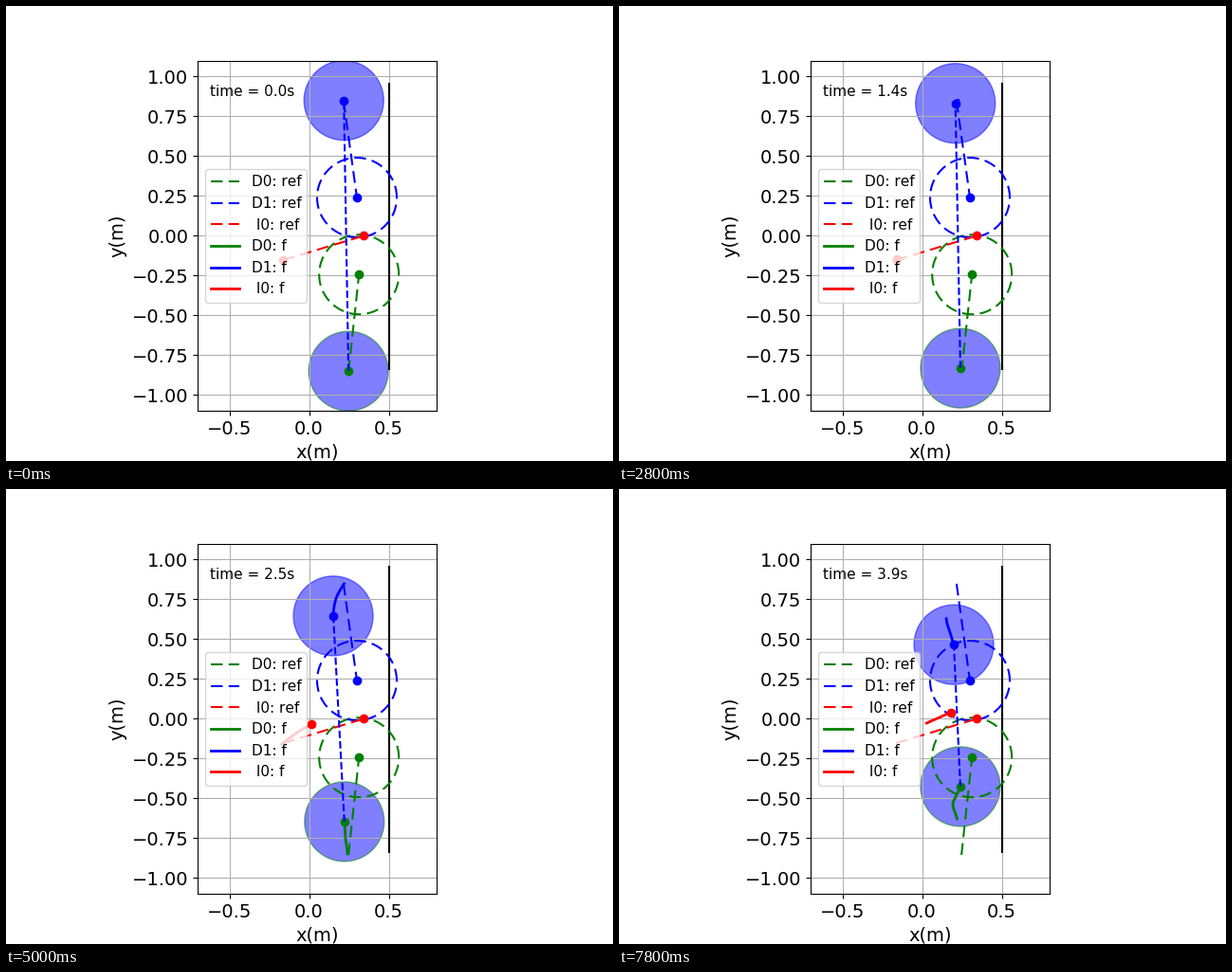
Animation, 640 px wide and 480 px high, one loop 8000 ms. Source, as a matplotlib script:

```python
import numpy as np
import matplotlib.pyplot as plt
from matplotlib.animation import FuncAnimation
from matplotlib.patches import Circle

FRAMES = 40
STEP = 0.1        # simulated seconds per frame
WINDOW = 13       # trail length in frames
RADIUS = 0.25
LONG_DASH = (0, (6, 3))
t = np.arange(FRAMES) * STEP


def approach(rate=1.0, start=1.1):
    """Critically damped response from 0 towards 1."""
    u = np.maximum(t - start, 0) * rate
    return 1 - (1 + u) * np.exp(-u)


def sway(*values):
    """Smooth curve through evenly spaced values over the whole run."""
    v = np.array(values)
    slope = np.gradient(v)
    s = t / t[-1] * (len(v) - 1)
    i = np.minimum(s.astype(int), len(v) - 2)
    u = s - i
    return ((1 + 2 * u) * (1 - u) ** 2 * v[i] + u * (1 - u) ** 2 * slope[i]
            + u * u * (3 - 2 * u) * v[i + 1] + u * u * (u - 1) * slope[i + 1])


wobble = .005 * np.cos(3 * t)
push = .11 * np.maximum(t - 3.3, 0) ** 2
tracks = {
    "green": np.column_stack([sway(.247, .232, .241, .228, .219, .193, .240),
                              -.850 + .5 * approach() + push]),
    "blue": np.column_stack([sway(.218, .228, .215, .166, .152, .178, .199),
                             .850 - .5 * approach()]),
    "red": np.column_stack([-.171 + .45 * approach() + wobble,
                            -.158 + .22 * approach(1.33) + wobble]),
}
labels = {"green": "D0", "blue": "D1", "red": " I0"}
starts = {"green": (.247, -.855), "blue": (.216, .848), "red": (-.164, -.153)}
goals = {"green": (.313, -.243), "blue": (.300, .240), "red": (.343, 0)}

plt.rcParams["font.family"] = "DejaVu Sans"
plt.rcParams["text.kerning_factor"] = 6
fig, ax = plt.subplots(figsize=(6.4, 4.8), dpi=100)
ax.set_aspect("equal")
ax.set(xlim=(-.7, .8), ylim=(-1.1, 1.1))
ax.set_xlabel("x(m)", fontsize=14)
ax.set_ylabel("y(m)", fontsize=14)
ax.tick_params(labelsize=14)
ax.set_yticks(np.arange(-1, 1.01, .25))
ax.grid(True)

ax.plot([.5, .5], [-.837, .954], color="black", lw=1.5)

angle = np.linspace(0, 2 * np.pi, 100)
for color, (x, y) in goals.items():
    ax.plot(*zip(starts[color], (x, y)), ls=LONG_DASH, color=color,
            label=labels[color] + ": ref")
    ax.plot(x, y, "o", color=color)
    if color != "red":
        ax.plot(x + RADIUS * np.cos(angle), y + RADIUS * np.sin(angle),
                ls=LONG_DASH, color=color)

trails, dots, discs = {}, {}, {}
for color in tracks:
    trails[color], = ax.plot([], [], color=color, lw=2, label=labels[color] + ": f")
    dots[color], = ax.plot([], [], "o", color=color)
    if color != "red":
        discs[color] = ax.add_patch(Circle((0, 0), RADIUS, fc="blue", ec=color, alpha=.5))

link, = ax.plot([], [], "--", color="blue")
clock = ax.text(.05, .9, "", transform=ax.transAxes, fontsize=11)
ax.legend(loc="center left", fontsize=11)


def draw(frame):
    for color, track in tracks.items():
        x, y = track[frame]
        trails[color].set_data(*track[max(0, frame - WINDOW):frame + 1].T)
        dots[color].set_data([x], [y])
        if color in discs:
            discs[color].center = x, y
    link.set_data(*zip(tracks["green"][frame], tracks["blue"][frame]))
    clock.set_text(f"time = {frame * STEP:.1f}s")
    return [*trails.values(), *dots.values(), *discs.values(), link, clock]


anim = FuncAnimation(fig, draw, frames=FRAMES, interval=200, repeat=True)
plt.show()
```
